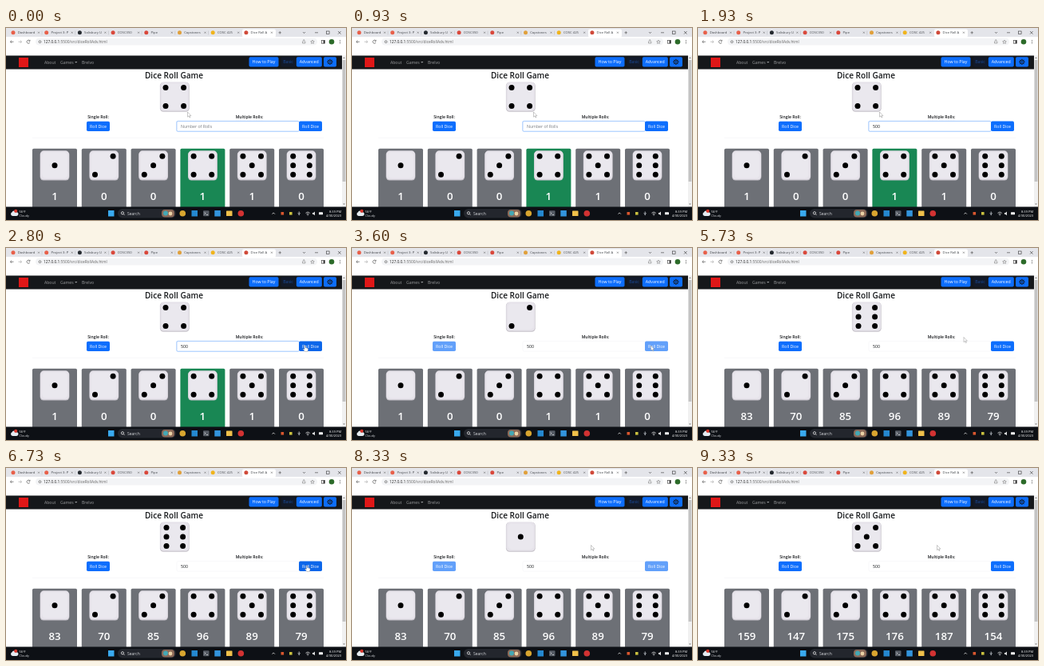
Animation of 426x240 px, one loop 9.39 s. Source, as an HTML page:

```html
<!DOCTYPE html>
<html lang="en">
<head>
<meta charset="utf-8">
<title>Dice Roll Game</title>
<style>
html, body { margin: 0; width: 100%; height: 100%; overflow: hidden; background: #fff; }
svg { display: block; width: 426px; height: 240px; font-family: "Open Sans", "Noto Sans", sans-serif; }
</style>
</head>
<body>
<svg id="stage" viewBox="0 0 426 240" xmlns="http://www.w3.org/2000/svg"></svg>
<script>
const NS = "http://www.w3.org/2000/svg";
const stage = document.getElementById("stage");
const BLUE = "#0d6efd", FADED = "#62a0fa", HOVER = "#0c66ea";
const INK = "#16181b", NAV = "#15171a", CARD = "#6d7076", GREEN = "#198754";

function add(tag, attrs, parent = stage) {
  const el = document.createElementNS(NS, tag);
  for (const k in attrs) el.setAttribute(k, attrs[k]);
  parent.appendChild(el);
  return el;
}
const rect = (x, y, width, height, fill, rx = 0, more = {}) =>
  add("rect", { x, y, width, height, fill, rx, ...more });
const dot = (cx, cy, r, fill, parent) => add("circle", { cx, cy, r, fill }, parent);
const ring = (cx, cy, r, stroke) => add("circle", { cx, cy, r, stroke, fill: "none", "stroke-width": 0.8 });
const line = (d, stroke, width = 0.7) =>
  add("path", { d, stroke, "stroke-width": width, fill: "none" });
function text(str, x, y, size, fill, anchor = "start", weight = 400) {
  const el = add("text", { x, y, fill, "font-size": size, "text-anchor": anchor, "font-weight": weight });
  el.textContent = str;
  return el;
}
function button(label, x, y, w, h, fill = BLUE, ink = "#fff", size = 5.25) {
  const box = rect(x, y, w, h, fill, 1.8);
  text(label, x + w / 2, y + h / 2 + 1.9, size, ink, "middle");
  return box;
}

// Pips as [column, row] offsets in -1..1
const PIPS = {
  1: [[0, 0]],
  2: [[1, -1], [-1, 1]],
  3: [[1, -1], [0, 0], [-1, 1]],
  4: [[-1, -1], [1, -1], [-1, 1], [1, 1]],
  5: [[-1, -1], [1, -1], [0, 0], [-1, 1], [1, 1]],
  6: [[-1, -1], [-1, 0], [-1, 1], [1, -1], [1, 0], [1, 1]]
};
function die(cx, cy) {
  rect(cx - 18.4, cy - 18.2, 36.8, 37, "#c4c0c8", 4.5);
  rect(cx - 18, cy - 18.2, 36, 36, "#e6e3ea", 4.5);
  rect(cx - 16, cy - 16.5, 32, 32.5, "#eae8ee", 5);
  const faces = [1, 2, 3, 4, 5, 6].map(n => {
    const g = add("g", {});
    for (const [c, r] of PIPS[n]) dot(cx + c * (n === 6 ? 10.3 : 11.3), cy + r * 11.5, 3.5, "#000", g);
    return g;
  });
  return n => faces.forEach((g, i) => g.setAttribute("display", i + 1 === n ? "inline" : "none"));
}

function browser() {
  rect(0, 0, 426, 240, "#fff");
  rect(0, 0, 426, 11, "#e4e5ea");
  rect(296, 1.5, 42, 10, "#fff", 2);
  const tabs = [
    ["Dashboard", "#e8604a"], ["Project 3: P", "#e8604a"], ["Salisbury U", "#24292f"], ["COSC350", "#d9483b"],
    ["Pipe", "#d9483b"], ["Capstones", "#e0a03b"], ["COSC 425", "#f0b41c"], ["Dice Roll A", "#d04a3a"]
  ];
  tabs.forEach(([name, color], i) => {
    const x = 6 + i * 41.7;
    dot(x + 3, 5.8, 2.5, color);
    text(name, x + 8.7, 7.3, 4.2, "#45484d");
    line(`M${x + 34} 4.7l2 2m0-2l-2 2`, "#555", 0.5);
    if (i < 6) line(`M${x + 39} 3.5v5`, "#a9adb3", 0.4);
  });
  line("M341.5 5.8h3.4m-1.7-1.7v3.4", "#444", 0.6);
  line("M372 5l1.5 1.5l1.5-1.5M387 5.8h4M416 4l3.6 3.6m0-3.6l-3.6 3.6", "#333", 0.6);
  rect(401.5, 4, 3.6, 3.6, "none", 0, { stroke: "#333", "stroke-width": 0.6 });

  rect(37, 12.7, 353, 8.8, "#f3f4f6", 4.4);
  line("M9.5 17.2h-4m1.6-1.7l-1.7 1.7l1.7 1.7", "#555");
  line("M15.5 17.2h4m-1.6-1.7l1.7 1.7l-1.7 1.7", "#aaa");
  line("M29.8 16.2a2 2 0 1 0 .1 1.8M30 14.8v1.6h-1.6", "#555");
  ring(42.5, 17.2, 1.4, "#666");
  const url = text("127.0.0.1", 47, 18.9, 4.8, "#222");
  add("tspan", { fill: "#666" }, url).textContent = ":5500/src/diceRollAdv.html";
  line("M371.5 16.4v2.6h3.4v-2.6m-1.7 1.2v-3m-1 1l1-1l1 1", "#666", 0.5);
  line("M384 15l.7 1.5l1.6.2l-1.2 1.1l.3 1.6l-1.4-.8l-1.4.8l.3-1.6l-1.2-1.1l1.6-.2z", "#666", 0.5);
  rect(395.5, 15.4, 3.8, 3.8, "none", 0, { stroke: "#333", "stroke-width": 0.6 });
  rect(397.6, 15.4, 1.7, 3.8, "#333");
  dot(408, 17.2, 3.3, "#2c6b2a");
  [15.5, 17.2, 18.9].forEach(y => dot(418.5, y, 0.5, "#444"));
}

function navbar() {
  rect(0, 34.5, 421, 17, NAV);
  rect(16, 37, 12, 12, "#df1717");
  const soft = "#9b9d9f";
  text("About", 48, 44.5, 5.1, soft);
  text("Games", 68, 44.5, 5.1, soft);
  add("path", { d: "M86.2 42h3.2l-1.6 1.7z", fill: soft });
  text("Brelvo", 95, 44.5, 5.1, soft);
  button("How to Play", 304.5, 36.3, 37, 12.2);
  button("Basic", 344.5, 36.3, 18, 12.2, "#121a2a", "#1a4c9c");
  button("Advanced", 363.8, 36.3, 32, 12.2);
  rect(398, 36.3, 16, 12.2, BLUE, 1.8);
  ring(405.9, 42.4, 2.2, NAV);
  for (let i = 0; i < 8; i++)
    add("path", {
      d: "M405.9 38.8v1.4", stroke: NAV, "stroke-width": 1.1,
      transform: `rotate(${i * 45} 405.9 42.4)`
    });
  dot(405.9, 42.4, 0.8, NAV);

  rect(421, 34.5, 5, 189, "#f1f1f1");
  rect(421.6, 40, 3.8, 152, "#c4c4c4");
  add("path", { d: "M422.2 38h2.6l-1.3-1.6z", fill: "#777" });
  add("path", { d: "M422.2 219.5h2.6l-1.3 1.6z", fill: "#777" });
}

function taskbar() {
  rect(0, 223.5, 426, 16.5, "#0d1015");
  rect(6, 230.3, 9.5, 4.6, "#e6ebf1", 2.3);
  dot(10, 230.8, 2.4, "#e6ebf1");
  dot(12.2, 228.8, 2.1, "#d9372c");
  text("56°F", 16.5, 231, 3.9, "#fff");
  text("Cloudy", 16.5, 236, 3.9, "#d0d2d6");
  rect(128, 228, 7.5, 7.5, "#39a9ee");
  rect(140, 226, 73, 11.5, "#23262d", 5.7);
  ring(146, 231.3, 1.6, "#eee");
  line("M147.2 232.5l1.5 1.5", "#eee");
  text("Search", 152, 233.6, 5, "#d6d8dc");
  rect(195, 227, 16, 9.5, "#8d6a58", 4);
  dot(200, 231.5, 3, "#45a8b4");
  dot(206, 232, 2.4, "#ead2a5");
  dot(221.3, 231.8, 3.8, "#d8a52f");
  rect(232.5, 228, 7.5, 7.5, "#2588d0");
  rect(247, 228.3, 7.5, 7, "#555b64", 1);
  line("M248.5 230.3l1.6 1.4l-1.6 1.4M251 233.5h2", "#fff", 0.6);
  rect(261.3, 228, 7.5, 7.5, "#3394dc");
  rect(276, 228.5, 7.5, 6.5, "#f0c04a", 0.6);
  dot(294.3, 231.8, 3.8, "#d23232");
  line("M333.5 232.6l1.7-1.7l1.7 1.7", "#fff", 0.7);
  rect(344.5, 230, 3.6, 3.6, "#d9572f");
  rect(355, 230, 3.6, 3.6, "#c9c03f");
  line("M367.2 229.5v2.5M365.6 231.5q1.6 2.6 3.2 0M367.2 232.8v1.4", "#dde2ea", 0.8);
  line("M375.5 231.3q2.6-2.6 5.2 0M376.7 232.7q1.4-1.4 2.8 0", "#fff", 0.7);
  dot(378.1, 233.8, 0.6, "#fff");
  add("path", { d: "M384 231h1.2l1.7-1.5v4.8l-1.7-1.5h-1.2z", fill: "#fff" });
  rect(392, 230.3, 5, 3, "#fff", 0.5);
  text("8:39 PM", 420, 230.8, 4, "#fff", "end");
  text("4/30/2023", 420, 236, 4, "#fff", "end");
}

browser();
navbar();
text("Dice Roll Game", 210.5, 63, 10.1, INK, "middle", 600);
const mainDie = die(211.3, 86);
text("Single Roll:", 115.5, 112.7, 5.1, INK, "middle", 600);
text("Multiple Rolls:", 305, 112.7, 5.1, INK, "middle", 600);
const single = button("Roll Dice", 101, 116.8, 29, 12.2);
const glow = rect(213.3, 115.8, 154, 14, "#c8dffe", 2);
const field = rect(214, 116.6, 153.5, 12.5, "#fff", 1.5, { "stroke-width": 0.6 });
const value = text("", 219, 124.7, 5.2, INK);
const multi = button("Roll Dice", 367, 116.6, 29, 12.5);
line("M33 137.3h365", "#f1f1f3", 0.6);

const cards = [1, 2, 3, 4, 5, 6].map((n, i) => {
  const x = 33 + i * 61.8, mid = x + 28;
  const box = rect(x, 150.8, 56, 80, CARD, 1.8);
  die(mid, 171.8)(n);
  return { box, count: text("", mid, 215.1, 13.3, "#fff", "middle", 600) };
});
taskbar();

const skin = { fill: "#fff", stroke: "#777", "stroke-width": 0.4 };
const arrow = add("path", { d: "M0 0v6.2l1.5-1.3l1 2.2l.9-.4l-1-2.1h2z", ...skin });
const hand = add("path", { d: "M-.6 0q.6-.8 1.2 0v2.6l3 .8q.6.3.5 1l-.6 3h-3.6l-2.3-3q.3-.8 1.8.2z", ...skin });

const LOOP = 9390, FPS = 15;
const FACES = [..."35164125362461352641"].map(Number);
const ROLLS = [{ start: 3000, end: 5000 }, { start: 7000, end: 9000 }];
const COUNTS = [[1, 0, 0, 1, 1, 0], [83, 70, 85, 96, 89, 79], [159, 147, 175, 176, 187, 154]];
const RESULTS = [4, 6, 5];
const TYPED = [[1067, "5"], [1267, "50"], [1467, "500"]];
// Pointer stops: time, x, y
const TRACK = [
  [0, 227.5, 105], [2100, 227.5, 105], [2750, 374.5, 122], [4600, 374.5, 122],
  [5300, 333, 111.5], [5950, 333, 111.5], [6500, 377, 122], [7250, 377, 122],
  [7950, 299.5, 96.5], [LOOP, 299.5, 96.5]
];

function pointer(t) {
  const i = Math.max(1, TRACK.findIndex(p => p[0] > t));
  const [t0, x0, y0] = TRACK[i - 1], [t1, x1, y1] = TRACK[i];
  const u = (t - t0) / (t1 - t0), e = u * u * (3 - 2 * u);
  return [x0 + (x1 - x0) * e, y0 + (y1 - y0) * e];
}

function draw(t) {
  const done = ROLLS.filter(r => t >= r.end).length;
  const roll = ROLLS.find(r => t >= r.start && t < r.end);
  const focused = t < 2900;
  mainDie(roll ? FACES[Math.floor((t - roll.start) / 100 + 0.001)] : RESULTS[done]);
  cards.forEach((c, i) => {
    c.count.textContent = COUNTS[done][i];
    c.box.setAttribute("fill", i === 3 && t < ROLLS[0].start ? GREEN : CARD);
  });

  let str = "";
  for (const [at, s] of TYPED) if (t >= at) str = s;
  value.textContent = str || "Number of Rolls";
  value.setAttribute("fill", str ? INK : "#777b80");
  glow.setAttribute("opacity", focused ? 1 : 0);
  field.setAttribute("stroke", focused ? "#86b7fe" : "#f3f4f6");

  const [x, y] = pointer(t);
  const over = x > 367 && x < 396 && y > 116 && y < 129;
  single.setAttribute("fill", roll ? FADED : BLUE);
  multi.setAttribute("fill", roll ? FADED : over ? HOVER : BLUE);
  const isHand = over && !roll;
  arrow.setAttribute("display", isHand ? "none" : "inline");
  hand.setAttribute("display", isHand ? "inline" : "none");
  (isHand ? hand : arrow).setAttribute("transform", `translate(${x} ${y})`);
}

const begin = performance.now();
function tick(now) {
  const t = Math.max(0, now - begin) % LOOP;
  const step = Math.min(140, Math.floor((t + 4) * FPS / 1000));
  draw(step * 1000 / FPS);
  requestAnimationFrame(tick);
}
draw(0);
requestAnimationFrame(tick);
</script>
</body>
</html>
```
